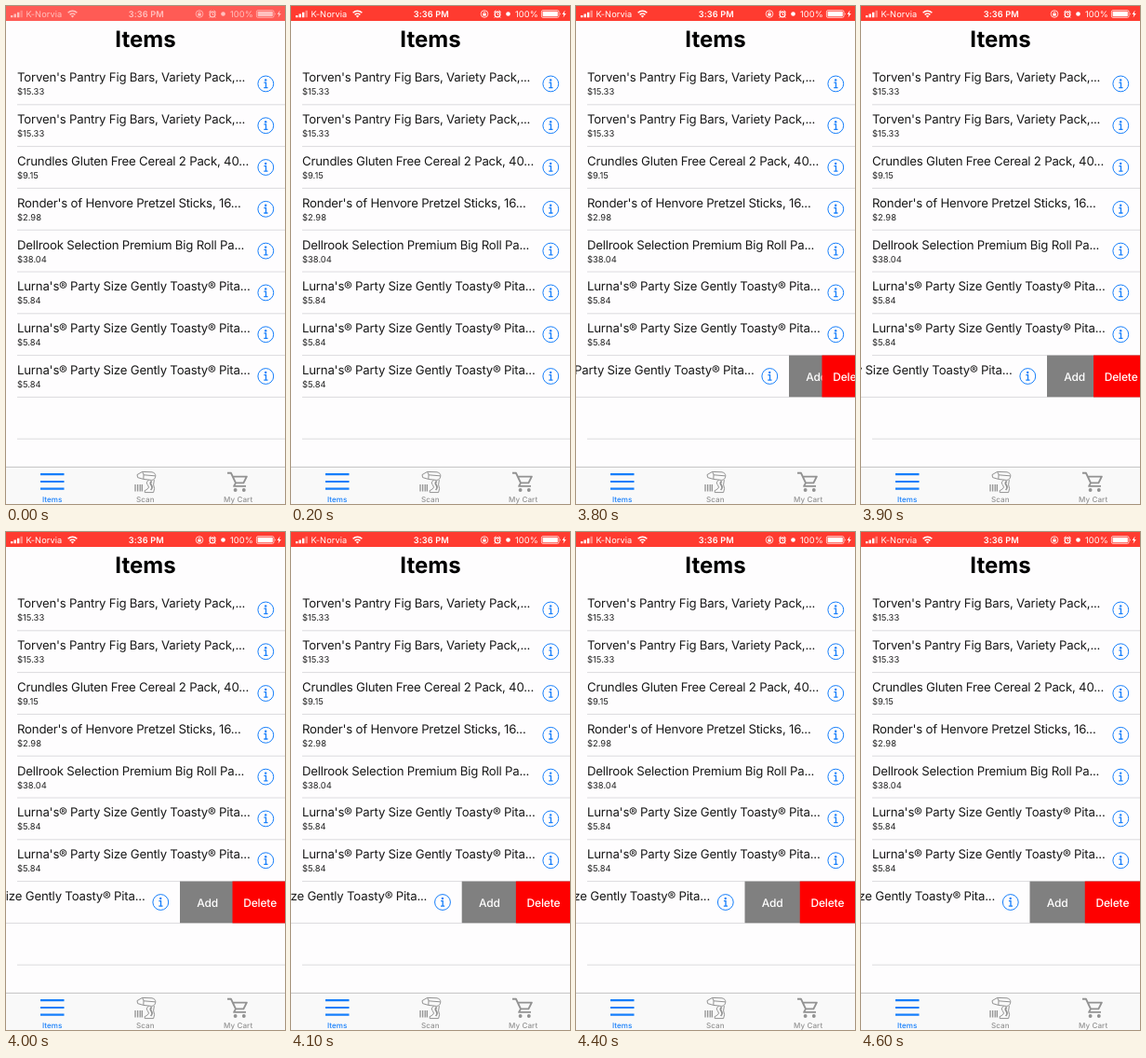
Animation of 300x534 px, one loop 5.2 s. Source, as an HTML page:

```html
<!DOCTYPE html>
<html lang="en">
<head>
<meta charset="utf-8">
<title>Items list</title>
<style>
  @property --swipe { syntax: "<length>"; inherits: true; initial-value: 0px; }
  html, body { margin: 0; width: 100%; height: 100%; overflow: hidden; background: #fefdfe; }
  svg { display: block; width: 100%; height: 100%; }
  text { font-family: Inter, Roboto, sans-serif; text-rendering: geometricPrecision; }
  .mid { text-anchor: middle; }

  .bar { fill: #ff3b30; animation: bar 5.2s step-end infinite; }
  .status { fill: #fff; animation: status 5.2s step-end infinite; }
  .status text { font-size: 9.2px; letter-spacing: .1px; }
  .line { fill: none; stroke: #fff; }

  .heading { font-size: 24px; font-weight: 700; }
  .name { font-size: 13.2px; letter-spacing: -.2px; fill: #181818; }
  .price { font-size: 9.4px; fill: #222; }
  .rule { stroke: #d3d2d7; stroke-width: .8; }
  .info { fill: none; stroke: #157efb; }

  .swipe { animation: swipe 5.2s step-end infinite; }
  .slide { transform: translateX(calc(-1 * var(--swipe))); }
  .half { transform: translateX(calc(-.5 * var(--swipe))); }
  .action { font-size: 12px; font-weight: 500; letter-spacing: -.15px; fill: #fff; }

  .tab { font-size: 8px; font-weight: 500; letter-spacing: .1px; fill: #929292; }
  .tab.on { fill: #157efb; }
  .icon { fill: none; stroke: #929292; stroke-linejoin: round; }

  @keyframes bar {
    0% { fill: #ff5b55; }
    1.92% { fill: #ff463d; }
    3.84%, 100% { fill: #ff3b30; }
  }
  @keyframes status {
    0% { opacity: .62; }
    1.92% { opacity: .85; }
    3.84%, 100% { opacity: 1; }
  }
  /* Decelerating swipe, sampled ten times a second */
  @keyframes swipe {
    0% { --swipe: 0px; }
    71.15% { --swipe: 23.8px; }
    73.07% { --swipe: 71px; }
    74.99% { --swipe: 100px; }
    76.92% { --swipe: 113px; }
    78.84% { --swipe: 116.3px; }
    80.76% { --swipe: 117.6px; }
    82.69% { --swipe: 118.1px; }
    84.61%, 100% { --swipe: 118.5px; }
  }
</style>
</head>
<body>
<svg viewBox="0 0 300 534">
  <rect width="300" height="534" fill="#fefdfe"/>
  <text class="heading mid" x="150" y="43.7">Items</text>
  <g id="list"></g>

  <rect class="bar" width="300" height="16"/>
  <g class="status">
    <path d="M5 10h2.4v2.2H5zM8.5 8.6h2.4v3.6H8.5zM12 6.8h2.4v5.4H12z"/>
    <path d="M15.5 4.8h2.4v7.4h-2.4z" opacity=".4"/>
    <text x="21.5" y="12">K-Norvia</text>
    <path class="line" stroke-width="1.5" d="M66.6 7.2a7 7 0 0 1 9.8 0M68.6 9.4a4.2 4.2 0 0 1 5.8 0"/>
    <path d="M71.5 12.6l-1.7-1.8a2.4 2.4 0 0 1 3.4 0z"/>
    <text class="mid" x="150.8" y="12" font-weight="600">3:36 PM</text>
    <circle class="line" cx="208" cy="8.5" r="3.8" stroke-width=".8"/>
    <path d="M206.3 8h3.4v2.6h-3.4z"/>
    <path class="line" stroke-width=".7" d="M207 8v-.7a1 1 0 0 1 2 0v.7"/>
    <circle class="line" cx="222" cy="9" r="2.9" stroke-width="1.2"/>
    <path class="line" stroke-width="1" d="M218.3 6.6l2-1.9M225.7 6.6l-2-1.9M222 7.4v1.8h1.4M219.8 11.3l-1 1.2M224.2 11.3l1 1.2"/>
    <circle cx="233.5" cy="8.5" r="2.3"/>
    <text x="241" y="12">100%</text>
    <rect class="line" x="269.4" y="4.6" width="18.6" height="7.8" rx="1.6" stroke-width=".7"/>
    <rect x="270.6" y="5.8" width="16.2" height="5.4" rx=".7"/>
    <path d="M289 7.2q1.4 1.3 0 2.6zM294.6 4.6l-3 4.4h1.8l-.8 3.6 3.2-4.7h-1.9z"/>
  </g>

  <rect y="494" width="300" height="40" fill="#f9f9f9"/>
  <path d="M0 494.4H300" stroke="#b8b8b8" stroke-width=".8"/>
  <path d="M37 502.2h25.5M37 510h25.5M37 517.6h25.5" stroke="#157efb" stroke-width="2.2"/>
  <g class="icon">
    <path d="M141 502.6l5.6-3.2 10.4.4q4 1 3.8 4.2-.4 4.2-4.4 4.4l-8.6-1-6.2-1.8zM146.6 499.4l1.4 3.4 12 1M148 502.8l-.2 4.4"/>
    <path d="M153.6 508.4q-4 2.2-1.2 5.2 2.6 2.6-.6 4.6l-2.6 1.4v2h9.4l1-4-1-4.4.8-5"/>
    <path d="M156.6 509.4q-2.4 2.4-.2 4.6 1.6 2.6-.8 5" stroke-width="1.7"/>
    <path d="M139 513v7.5M141.6 513v7.5M144.2 513v7.5M146.3 513v7.5" stroke-width="1.3"/>
  </g>
  <g class="icon" stroke-width="1.9">
    <path d="M238 500.8h4l5 10.6h8.4l3.4-6.8h-14.8M247 511.4l-1.9 3.5h12.9"/>
    <circle cx="246.6" cy="519" r="1" />
    <circle cx="255.8" cy="519" r="1" />
  </g>
  <text class="tab on mid" x="49.7" y="531.5">Items</text>
  <text class="tab mid" x="149.8" y="531.5">Scan</text>
  <text class="tab mid" x="249.7" y="531.5">My Cart</text>
</svg>
<script>
  const TOP = 61, PITCH = 44.8;
  const figs = ["Torven's Pantry Fig Bars, Variety Pack,...", "$15.33"];
  const pita = ["Lurna's® Party Size Gently Toasty® Pita...", "$5.84"];
  const items = [
    figs, figs,
    ["Crundles Gluten Free Cereal 2 Pack, 40...", "$9.15"],
    ["Ronder's of Henvore Pretzel Sticks, 16...", "$2.98"],
    ["Dellrook Selection Premium Big Roll Pa...", "$38.04"],
    pita, pita, pita
  ];

  const rule = y => `<path class="rule" d="M12 ${y}H300"/>`;

  const info = y => `<g class="info" transform="translate(279.3 ${y})">
    <circle r="8.4"/>
    <circle cx="-.1" cy="-4" r="1.2" fill="#157efb" stroke="none"/>
    <path d="M-1.9 -1.3H.2V4.2M-2 4.2H2.2" stroke-width="1.3"/></g>`;

  const row = ([name, price], y) => `
    <text class="name" x="12" y="${y + 20.4}">${name}</text>
    <text class="price" x="12" y="${y + 34.4}">${price}</text>
    ${info(y + 22.4)}${rule(y + PITCH)}`;

  const action = (label, color, y, move) => `<g class="${move}">
    <rect x="300" y="${y}" width="120" height="${PITCH}" fill="${color}"/>
    <text class="action mid" x="329.6" y="${y + 27}">${label}</text></g>`;

  const rows = items.map((item, i) => {
    const y = TOP + i * PITCH;
    if (i < items.length - 1) return row(item, y);
    return `<g class="swipe"><g class="slide">${row(item, y)}</g>
      ${action("Add", "#808080", y, "slide")}
      ${action("Delete", "#fe0000", y, "half")}</g>`;
  });
  document.getElementById("list").innerHTML =
    rows.join("") + rule(TOP + (items.length + 1) * PITCH);
</script>
</body>
</html>
```
